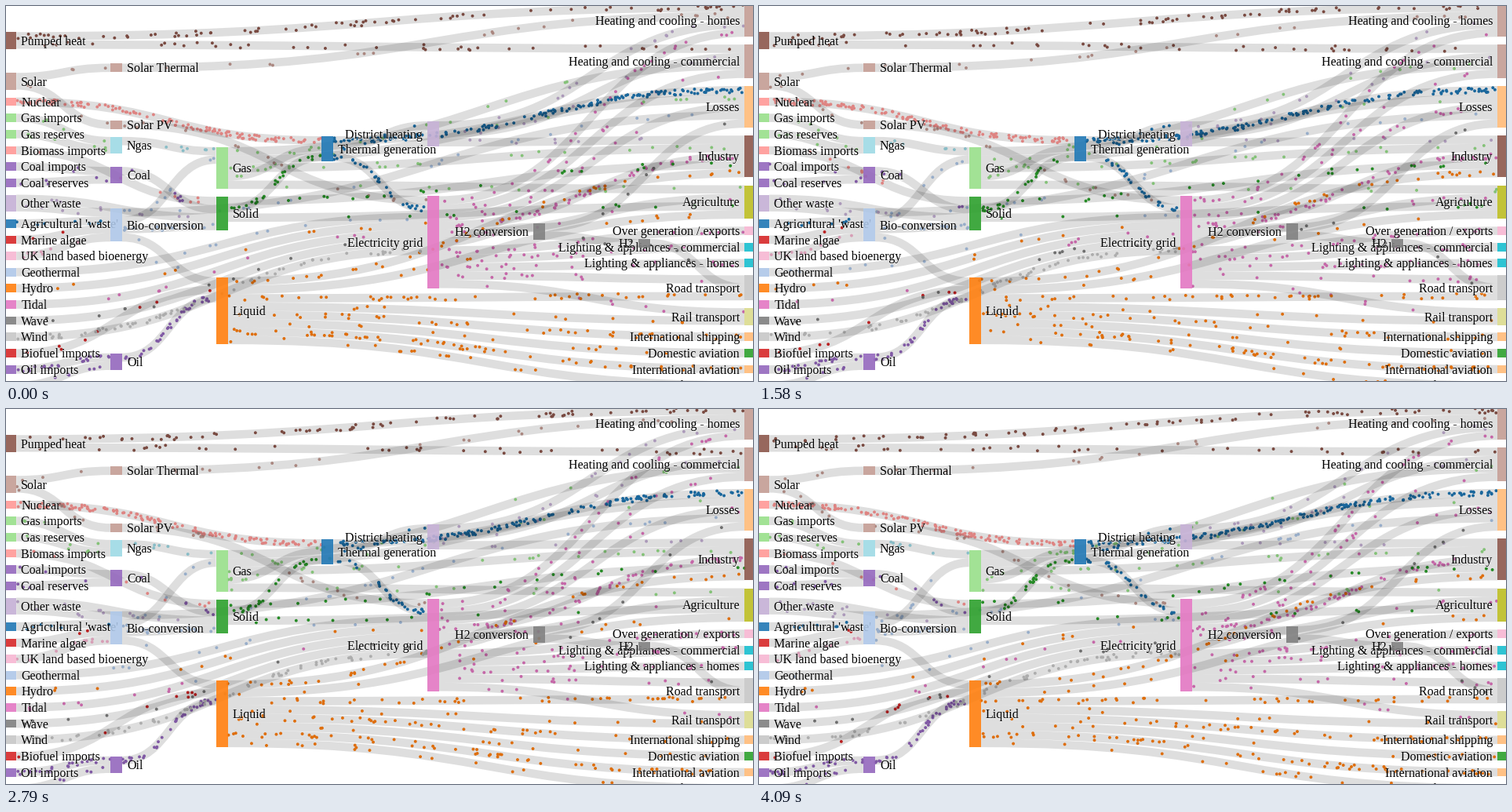
These frames come from a looping animation (952 by 478 pixels, 4190 ms). A matplotlib script:

```python
import numpy as np
import matplotlib.pyplot as plt
from matplotlib.animation import FuncAnimation
from matplotlib.patches import PathPatch, Rectangle
from matplotlib.path import Path

WIDTH, HEIGHT, DPI = 952, 478, 100
LOOP_MS, FRAMES = 4190, 35
PX = 72 / DPI
UNIT, NODE_W = 10.65, 15
LEFT, COLUMN_STEP = -1.8, 134.7
SPEED = 0.15  # pixels per millisecond

# name: (column, vertical centre), in drawing order
NODES = {
    "Agricultural 'waste'": (0, 277.2), "Bio-conversion": (1, 279),
    "Liquid": (2, 388.5), "Losses": (7, 128.6), "Solid": (2, 264.5),
    "Gas": (2, 206.5), "Biofuel imports": (0, 442.7),
    "Biomass imports": (0, 184), "Coal imports": (0, 204.6), "Coal": (1, 215.8),
    "Coal reserves": (0, 225.2), "District heating": (4, 163),
    "Industry": (7, 191.8), "Heating and cooling - commercial": (7, 70.5),
    "Heating and cooling - homes": (7, 18), "Electricity grid": (4, 301),
    "Over generation / exports": (7, 286.6), "H2 conversion": (5, 287.3),
    "Road transport": (7, 359.3), "Agriculture": (7, 249.8),
    "Rail transport": (7, 395.9),
    "Lighting & appliances - commercial": (7, 307.2),
    "Lighting & appliances - homes": (7, 327.8), "Gas imports": (0, 142.6),
    "Ngas": (1, 177.5), "Gas reserves": (0, 163.3),
    "Thermal generation": (3, 182), "Geothermal": (0, 339.2),
    "H2": (6, 302.3), "Hydro": (0, 359.8),
    "International shipping": (7, 421.8), "Domestic aviation": (7, 442.4),
    "International aviation": (7, 463), "National navigation": (7, 483.7),
    "Marine algae": (0, 297.9), "Nuclear": (0, 121.9),
    "Oil imports": (0, 463.3), "Oil": (1, 453.3), "Oil reserves": (0, 484),
    "Other waste": (0, 251.2), "Pumped heat": (0, 43.9),
    "Solar PV": (1, 151.5), "Solar Thermal": (1, 78.8), "Solar": (0, 95.9),
    "Tidal": (0, 380.5), "UK land based bioenergy": (0, 318.5),
    "Wave": (0, 401.1), "Wind": (0, 421.8),
}

HOMES, OFFICES = "Heating and cooling - homes", "Heating and cooling - commercial"
GRID, THERMAL, BIO = "Electricity grid", "Thermal generation", "Bio-conversion"
DISTRICT = "District heating"

# source: {target: flow}; the flow sets how many particles travel the link
FLOWS = {
    "Agricultural 'waste'": {BIO: 125},
    BIO: {"Liquid": 1, "Losses": 27, "Solid": 280, "Gas": 81},
    "Biofuel imports": {"Liquid": 35},
    "Biomass imports": {"Solid": 35},
    "Coal imports": {"Coal": 12},
    "Coal reserves": {"Coal": 64},
    "Coal": {"Solid": 76},
    DISTRICT: {"Industry": 11, OFFICES: 23, HOMES: 46},
    GRID: {"Over generation / exports": 104, HOMES: 114, "H2 conversion": 27,
           "Industry": 342, "Road transport": 38, "Agriculture": 4,
           OFFICES: 41, "Losses": 57, "Rail transport": 8,
           "Lighting & appliances - commercial": 90,
           "Lighting & appliances - homes": 93},
    "Gas imports": {"Ngas": 41},
    "Gas reserves": {"Ngas": 82},
    "Gas": {OFFICES: 0, "Losses": 1, THERMAL: 152, "Agriculture": 2,
            "Industry": 49},
    "Geothermal": {GRID: 7},
    "H2 conversion": {"H2": 21, "Losses": 6},
    "H2": {"Road transport": 21},
    "Hydro": {GRID: 7},
    "Liquid": {"Industry": 121, "International shipping": 129,
               "Road transport": 136, "Domestic aviation": 14,
               "International aviation": 206, "Agriculture": 4,
               "National navigation": 33, "Rail transport": 4},
    "Marine algae": {BIO: 4},
    "Ngas": {"Gas": 123},
    "Nuclear": {THERMAL: 840},
    "Oil imports": {"Oil": 504},
    "Oil reserves": {"Oil": 108},
    "Oil": {"Liquid": 612},
    "Other waste": {"Solid": 57, BIO: 78},
    "Pumped heat": {HOMES: 193, OFFICES: 71},
    "Solar PV": {GRID: 60},
    "Solar Thermal": {HOMES: 19},
    "Solar": {"Solar Thermal": 19, "Solar PV": 60},
    "Solid": {"Agriculture": 1, THERMAL: 400, "Industry": 46},
    THERMAL: {GRID: 526, "Losses": 787, DISTRICT: 79},
    "Tidal": {GRID: 9},
    "UK land based bioenergy": {BIO: 182},
    "Wave": {GRID: 19},
    "Wind": {GRID: 289},
}

# Nodes whose names share a first word share a colour.
PALETTE = plt.get_cmap("tab20").colors
first_words = list(dict.fromkeys(name.split()[0] for name in NODES))
color_of = {name: PALETTE[first_words.index(name.split()[0]) % 20]
            for name in NODES}

targets = {n: list(FLOWS.get(n, {})) for n in NODES}
sources = {n: [s for s in FLOWS if n in FLOWS[s]] for n in NODES}
height = {n: UNIT * max(len(targets[n]), len(sources[n])) for n in NODES}
top = {n: NODES[n][1] - height[n] / 2 for n in NODES}
left = {n: LEFT + COLUMN_STEP * NODES[n][0] for n in NODES}
for group in (targets, sources):
    for names in group.values():
        names.sort(key=top.get)


def port(node, neighbours, other):
    """Height at which the link to or from `other` meets `node`."""
    return top[node] + UNIT * (neighbours[node].index(other) + 0.5)


class Link:
    def __init__(self, source, target, flow, rng):
        x0, x1 = left[source] + NODE_W, left[target]
        y0, y1 = port(source, targets, target), port(target, sources, source)
        xm = (x0 + x1) / 2
        self.path = Path([(x0, y0), (xm, y0), (xm, y1), (x1, y1)],
                         [Path.MOVETO] + [Path.CURVE4] * 3)
        t = np.linspace(0, 1, 80)
        self.x = (x0 * (1 - t)**3 + 3 * xm * t * (1 - t) + x1 * t**3)
        self.y = y0 + (y1 - y0) * t * t * (3 - 2 * t)
        steps = np.hypot(np.diff(self.x), np.diff(self.y))
        self.arc = np.concatenate([[0], np.cumsum(steps)])
        self.length = self.arc[-1]

        self.count = max(1, round(self.length * (0.016 + 0.00036 * flow)))
        self.start = rng.uniform(0, self.length, self.count)
        self.speed = SPEED * rng.uniform(0.5, 1.5, self.count)
        self.offset = rng.uniform(-0.5, 0.5, self.count) * (UNIT - 4)
        self.color = color_of[source]

    def particles(self, ms):
        travelled = (self.start + self.speed * ms) % self.length
        return np.column_stack([
            np.interp(travelled, self.arc, self.x),
            np.interp(travelled, self.arc, self.y) + self.offset])


rng = np.random.default_rng(7)
links = [Link(s, t, flow, rng)
         for s, outs in FLOWS.items() for t, flow in outs.items()]

fig = plt.figure(figsize=(WIDTH / DPI, HEIGHT / DPI), dpi=DPI, facecolor="white")
ax = fig.add_axes([0, 0, 1, 1])
ax.set(xlim=(0, WIDTH), ylim=(HEIGHT, 0))
ax.axis("off")


def draw_label(name, z):
    x, y = left[name], NODES[name][1] + 5.6
    on_left = x < WIDTH / 2
    x, align = (x + NODE_W + 6, "left") if on_left else (x - 6, "right")
    for dy, color in ((1, "white"), (0, "black")):
        ax.text(x, y + dy, name, ha=align, va="baseline", color=color,
                family="Liberation Serif", size=16 * PX, zorder=z)


# Particles lie below the translucent links, nodes and labels above them.
dots = ax.scatter(*np.vstack([k.particles(0) for k in links]).T,
                  c=[k.color for k in links for _ in range(k.count)],
                  s=(3.9 * PX)**2, linewidths=0, zorder=1)
for link in links:
    ax.add_patch(PathPatch(link.path, fill=False, edgecolor="black", alpha=0.13,
                           linewidth=UNIT * PX, capstyle="butt", zorder=2))
for i, name in enumerate(NODES):
    z = 3 + i
    ax.add_patch(Rectangle((left[name], top[name]), NODE_W, height[name],
                           facecolor=color_of[name], alpha=0.9, linewidth=0,
                           zorder=z))
    draw_label(name, z + 0.5)


def update(frame):
    ms = frame * LOOP_MS / FRAMES
    dots.set_offsets(np.vstack([k.particles(ms) for k in links]))
    return [dots]


animation = FuncAnimation(fig, update, frames=FRAMES,
                          interval=LOOP_MS / FRAMES, repeat=True, repeat_delay=0)
plt.show()
```
